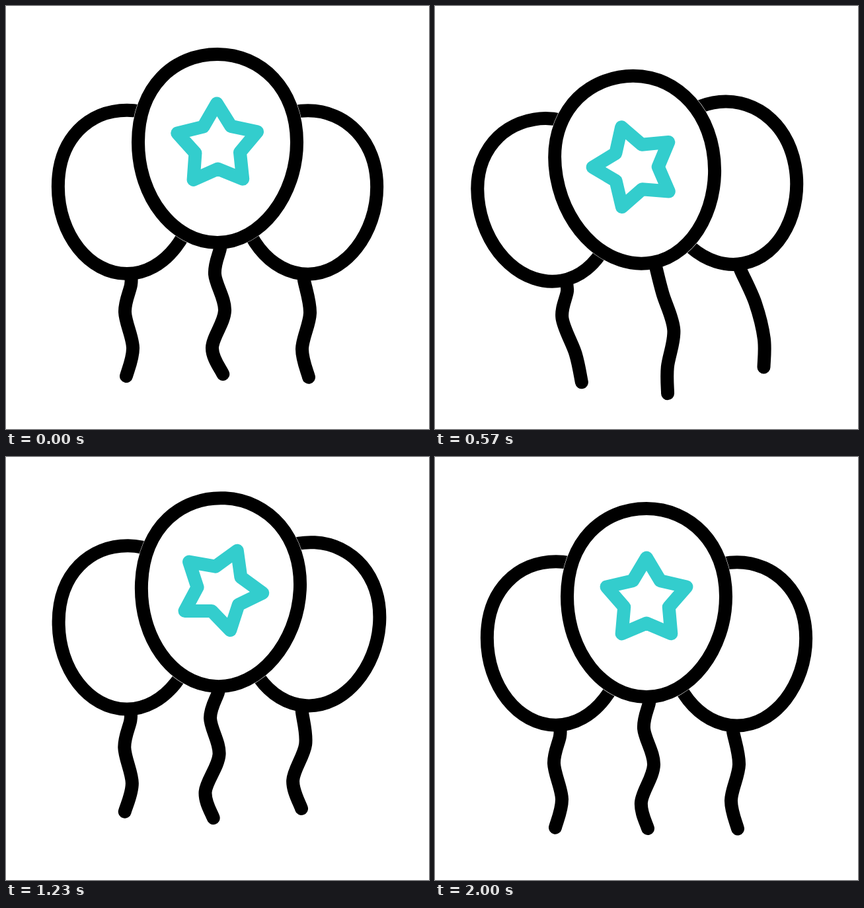
An HTML page for the animation above (2130 ms loop, 640x640 px).

```html
<!DOCTYPE html>
<html lang="en">
<head>
<meta charset="utf-8">
<title>Balloons</title>
<style>
  html, body { margin: 0; height: 100%; overflow: hidden; background: #fff; }
  svg { display: block; width: 100vw; height: 100vh; }
  path { fill: none; stroke: #000; stroke-width: 20; stroke-linecap: round; stroke-linejoin: round; }
  .skin { fill: #fff; }
  .gap { stroke: #fff; stroke-width: 21; }
  .star { stroke: #33cdcd; }
</style>
</head>
<body>
<svg viewBox="0 0 640 640"></svg>
<script>
const LOOP = 2130, STEP = 100 / 3, LAST = 60;
const svg = document.querySelector('svg');

// Monotone cubic curve through [time, value] keys, flat at peaks and ends.
function curve(...keys) {
  const end = keys.length - 1;
  const rate = i => (keys[i + 1][1] - keys[i][1]) / (keys[i + 1][0] - keys[i][0]);
  const slope = keys.map((_, i) => {
    if (i === 0 || i === end) return 0;
    const a = rate(i - 1), b = rate(i);
    return a * b <= 0 ? 0 : 2 * a * b / (a + b);
  });
  return time => {
    const t = Math.min(Math.max(time, keys[0][0]), keys[end][0]);
    let i = 0;
    while (i < end - 1 && t > keys[i + 1][0]) i++;
    const [t0, a] = keys[i], [t1, b] = keys[i + 1];
    const h = t1 - t0, u = (t - t0) / h, v = 1 - u;
    return v * v * (1 + 2 * u) * a + u * u * (3 - 2 * u) * b
      + h * u * v * (v * slope[i] - u * slope[i + 1]);
  };
}

// Shared motion: a decaying bob, a lean to the left that swings back, one turn of the star.
const bob = curve([-2, 0], [8.6, -54], [20.8, 52], [33, -27], [46.5, 26], [58, 0]);
const lean = curve([0, 0], [16, -18], [36, 5], [53, 0]);
const spin = curve([0, -1], [12, 15], [22, 109], [37, 239], [49, 325], [LAST, 360]);

function addPath(cls, d = '') {
  const p = document.createElementNS('http://www.w3.org/2000/svg', 'path');
  p.setAttribute('class', cls);
  p.setAttribute('d', d);
  svg.append(p);
  return p;
}

function egg(s) {
  const w = 120 * s, top = -133 * s, low = 152 * s, k = 0.55;
  return `M0 ${top}C${w * k} ${top} ${w} ${top * 0.6} ${w} 0S${w * k} ${low} 0 ${low}
    S${-w} ${low * k} ${-w} 0S${-w * k} ${top} 0 ${top}Z`;
}

function starShape(outer, inner) {
  const pts = Array.from({ length: 10 }, (_, i) => {
    const r = i % 2 ? inner : outer, a = i * Math.PI / 5;
    return `${r * Math.sin(a)} ${-r * Math.cos(a)}`;
  });
  return `M${pts.join('L')}Z`;
}

function smooth(pts) {
  let d = `M${pts[0]}`;
  for (let i = 0; i < pts.length - 1; i++) {
    const a = pts[Math.max(i - 1, 0)], b = pts[i], c = pts[i + 1];
    const e = pts[Math.min(i + 2, pts.length - 1)];
    d += `C${b[0] + (c[0] - a[0]) / 6} ${b[1] + (c[1] - a[1]) / 6} `
      + `${c[0] - (e[0] - b[0]) / 6} ${c[1] - (e[1] - b[1]) / 6} ${c}`;
  }
  return d;
}

function place(el, x, y, r) {
  el.setAttribute('transform', `translate(${x} ${y}) rotate(${r})`);
}

// rise, swing: [strength, lag] of the bob and the lean; tilt: degrees per pixel of lean.
// tie: x and length of the knot below the rim.
// bends: [drop, x at rest, share of the lean it trails by, lag].
function balloon({ size = 1, x, y, rise, swing, tilt, tie, bends, gap }) {
  const parts = gap ? [addPath('gap', egg(size))] : [];
  const string = addPath('string');
  parts.push(addPath('skin', egg(size)));
  const rim = 152 * size;
  return t => {
    const shift = (lag = 0) => swing[0] * lean(t - swing[1] - lag);
    const cx = x + shift(), cy = y + rise[0] * bob(t - rise[1]), r = tilt * shift();
    const a = r * Math.PI / 180, cos = Math.cos(a), sin = Math.sin(a);
    const turn = (px, py) => [cx + px * cos - py * sin, cy + px * sin + py * cos];
    const knot = turn(tie[0], rim + tie[1]);
    const tail = bends.map(([drop, rest, trail, lag]) =>
      [knot[0] + rest - trail * shift(lag), knot[1] + drop]);
    string.setAttribute('d', smooth([turn(tie[0], rim), knot, ...tail]));
    parts.forEach(p => place(p, cx, cy, r));
    return [cx, cy];
  };
}

const left = balloon({
  size: 0.868, x: 183, y: 273.7,
  rise: [1.1, 1.4], swing: [1.05, 6.5], tilt: 0.7, tie: [6, 17],
  bends: [[41, -9, 0.1], [95, 3, 0.7], [138, -7, 2.1]]
});

const right = balloon({
  size: 0.868, x: 457, y: 273.7,
  rise: [1.1, 3.2], swing: [0.83, 0], tilt: 0.72, tie: [-6, 9],
  bends: [[50, 9, 0.9], [104, -3, 2.6], [147, 7, 1.9]]
});

const middle = balloon({
  x: 320, y: 211, gap: true,
  rise: [1, 0], swing: [1, 0], tilt: 0.57, tie: [4, 9],
  bends: [[39, -8, 1.1, 4], [94, 7, 1.1, 1], [150, -12, 1.7, 3], [190, -2, 1.5, -5]]
});

const star = addPath('star', starShape(63.5, 35.5));

function draw(now) {
  const t = Math.min(LAST, Math.floor((now % LOOP) / STEP + 0.11));
  left(t);
  right(t);
  const [x, y] = middle(t);
  place(star, x, y + 5, spin(t));
}

const start = performance.now();
function loop() {
  draw(performance.now() - start);
  requestAnimationFrame(loop);
}
loop();
</script>
</body>
</html>
```
